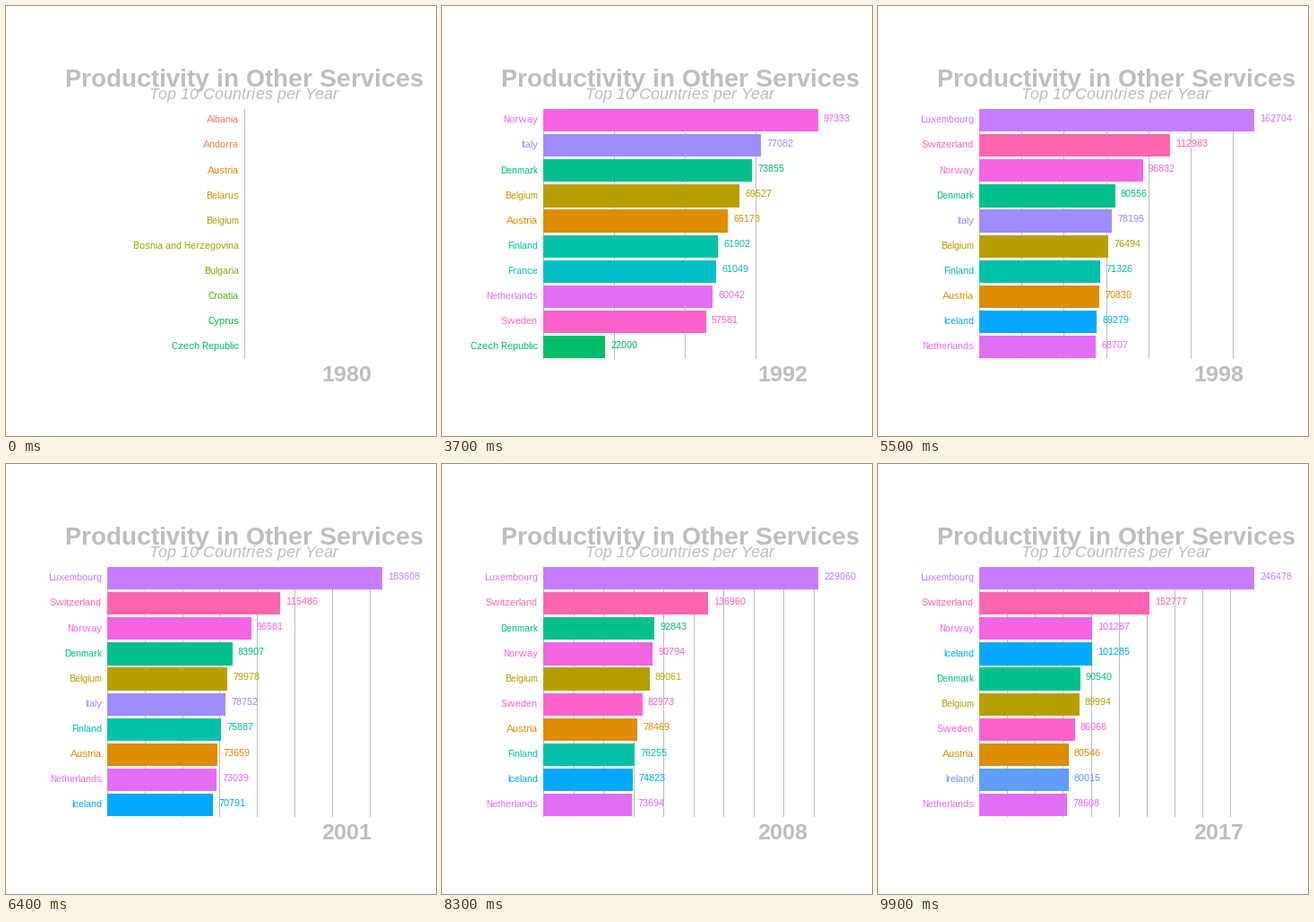
A matplotlib script that plays this animation: 480 by 480 pixels, repeating every 10 s.

```python
import math

import matplotlib.pyplot as plt
from matplotlib.animation import FuncAnimation
from matplotlib.patches import Rectangle

# Whole-pixel letter spacing, as on a plain screen device
plt.rcParams.update({
    "font.family": ["Liberation Sans", "DejaVu Sans"],
    "text.hinting": "native",
    "text.hinting_factor": 1,
})

SIZE = 480
FRAMES = 100
GREY = "#BEBEBE"
LEFT, RIGHT, MIDDLE = 113, 420, 266
TOP, ROW, BAR = 114.9, 28.13, 25.3
GAP = 6
GRID_STEP = 25000
ROWS = 10
FIRST_YEAR, FIRST_BAR_YEAR, TURN_YEAR, LAST_YEAR = 1980, 1992, 2005, 2017
TURN_FRAME = 76

NAMES = [
    "Albania", "Andorra", "Austria", "Belarus", "Belgium",
    "Bosnia and Herzegovina", "Bulgaria", "Croatia", "Cyprus",
    "Czech Republic", "Denmark", "Finland", "France", "Germany", "Greece",
    "Iceland", "Ireland", "Italy", "Luxembourg", "Netherlands", "Norway",
    "Sweden", "Switzerland", "Ukraine",
]

# Turning points only; the end slopes carry on beyond them
TRENDS = {
    "Luxembourg": {1994.5: 138315, 2001: 183608, 2005: 183612, 2012: 263146, 2017: 246478},
    "Switzerland": {1994.5: 110063, 2001: 115486, 2005: 134743, 2012: 138623, 2017: 152777},
    "Norway": {1994.5: 97124, 2005: 96247, 2012: 86704, 2017: 101287},
    "Italy": {1994.5: 77546, 2001: 78752, 2005: 74061},
    "Denmark": {1994.5: 76647, 2012: 96194, 2017: 90540},
    "Belgium": {1994.5: 72430, 2001: 79978, 2005: 92301, 2012: 86631, 2017: 89994},
    "Austria": {1994.5: 67530, 2005: 77431, 2017: 80546},
    "Finland": {1989: 56978, 1994.5: 66005, 2001: 75887, 2005: 76907, 2012: 75766},
    "Netherlands": {1994.5: 63652, 2001: 73039, 2005: 74864, 2012: 72816, 2017: 78608},
    "France": {1994.5: 62418, 2012: 72000},
    "Iceland": {2001: 70791, 2012: 76335, 2017: 101285},
    "Sweden": {1989: 53608, 2001: 69500, 2005: 81425, 2017: 86068},
    "Ireland": {2012: 70000, 2017: 80015},
    "Czech Republic": {1992: 22000, 2017: 40000},
}

# Countries whose records do not begin in FIRST_BAR_YEAR
STARTS = {"Finland": 1985, "Sweden": 1988, "Netherlands": 1991, "Switzerland": 1993,
          "Luxembourg": 1994, "Iceland": 1998, "Ireland": 2007}


def hcl(hue, chroma=100, lum=65):
    """Polar LUV colour as clipped sRGB."""
    y = ((lum + 16) / 116) ** 3
    angle = math.radians(hue)
    u = chroma * math.cos(angle) / (13 * lum) + 0.1978398
    v = chroma * math.sin(angle) / (13 * lum) + 0.4683363
    x = 9 * y * u / (4 * v)
    z = -x / 3 - 5 * y + 3 * y / v
    linear = (3.240479 * x - 1.537150 * y - 0.498535 * z,
              -0.969256 * x + 1.875992 * y + 0.041556 * z,
              0.055648 * x - 0.204043 * y + 1.057311 * z)
    return tuple(
        min(1, max(0, 1.055 * c ** (1 / 2.4) - 0.055 if c > 0.00304 else 12.92 * c))
        for c in linear)


COLORS = {name: hcl(15 + 360 * i / len(NAMES)) for i, name in enumerate(NAMES)}


def value(name, time):
    if name not in TRENDS or time < STARTS.get(name, FIRST_BAR_YEAR):
        return None
    points = list(TRENDS[name].items())
    for (t0, v0), (t1, v1) in zip(points, points[1:]):
        if time <= t1:
            break
    return v0 + (v1 - v0) * (time - t0) / (t1 - t0)


def ranking(year):
    """Top rows of one year: valued countries first, then the alphabet."""
    known = [n for n in NAMES if value(n, year) is not None]
    known.sort(key=lambda n: -value(n, year))
    blank = [n for n in NAMES if n not in known]
    return {n: i for i, n in enumerate((known + blank)[:ROWS])}


YEARS = range(FIRST_YEAR, LAST_YEAR + 1)
RANKS = {y: ranking(y) for y in YEARS}
PEAKS = {y: max(value(n, y) or 0 for n in NAMES) for y in YEARS}


def timing(frame):
    """Return the time of the data and the year of the caption.

    Up to TURN_FRAME a year takes three frames (rest, halfway, arrived),
    then two (rest, arrived). The caption follows at the next rest.
    """
    if frame <= TURN_FRAME:
        step, phase = divmod(max(frame - 1, 0), 3)
        year = FIRST_YEAR + step
        time = year + phase / 2
    else:
        step, phase = divmod(frame - TURN_FRAME, 2)
        year = TURN_YEAR + step
        time = year + phase
    return time, LAST_YEAR if time == LAST_YEAR else year


fig = plt.figure(figsize=(4.8, 4.8), dpi=100, facecolor="white")
ax = fig.add_axes([0, 0, 1, 1])
ax.set_xlim(0, SIZE)
ax.set_ylim(SIZE, 0)
ax.axis("off")
moving = []


def text(x, y, s, px, color=GREY, **style):
    return ax.text(x, y, s, fontsize=px * 0.72, color=color,
                   va="baseline", zorder=3, **style)


def box(x, y, x2, y2, color, zorder):
    patch = Rectangle((x, y), x2 - x, y2 - y, facecolor=color, linewidth=0,
                      antialiased=False, zorder=zorder)
    moving.append(ax.add_patch(patch))


text(266, 90, "Productivity in Other Services", 28, ha="center", weight="bold")
text(266, 104, "Top 10 Countries per Year", 18, ha="center", style="italic")
caption_text = text(408, 419, "", 25, ha="right", weight="bold")


def draw(frame):
    while moving:
        moving.pop().remove()
    time, caption = timing(frame)
    caption_text.set_text(str(caption))

    start, end = math.floor(time), math.ceil(time)
    before, after = RANKS[start], RANKS[end]
    rows = {n: (before[n] + after[n]) / 2 for n in before if n in after}

    has_bars = time >= FIRST_BAR_YEAR
    axis, scale, lines = MIDDLE, 0, [MIDDLE]
    if has_bars:
        peak = (PEAKS[start] + PEAKS[end]) / 2
        axis, scale = LEFT, (RIGHT - LEFT) / peak
        lines = [LEFT + n * GRID_STEP * scale for n in range(int(peak // GRID_STEP) + 1)]
    for x in lines:
        box(round(x), 115, round(x) + 1, 394, GREY, 1)

    for name, row in rows.items():
        color, shift = COLORS[name], row * ROW
        moving.append(text(axis - GAP, round(130.3 + shift), name, 11, color, ha="right"))
        amount = value(name, time)
        if amount is None:
            continue
        tip = axis + amount * scale
        if has_bars:
            y = TOP + shift
            box(axis, round(y), round(tip), round(y + BAR), color, 2)
        moving.append(text(round(tip + GAP), round(128.6 + shift),
                           str(round(amount)), 11, color, ha="left"))
    return moving


anim = FuncAnimation(fig, draw, frames=FRAMES, interval=100, repeat=True,
                     repeat_delay=0, blit=False)
plt.show()
```
